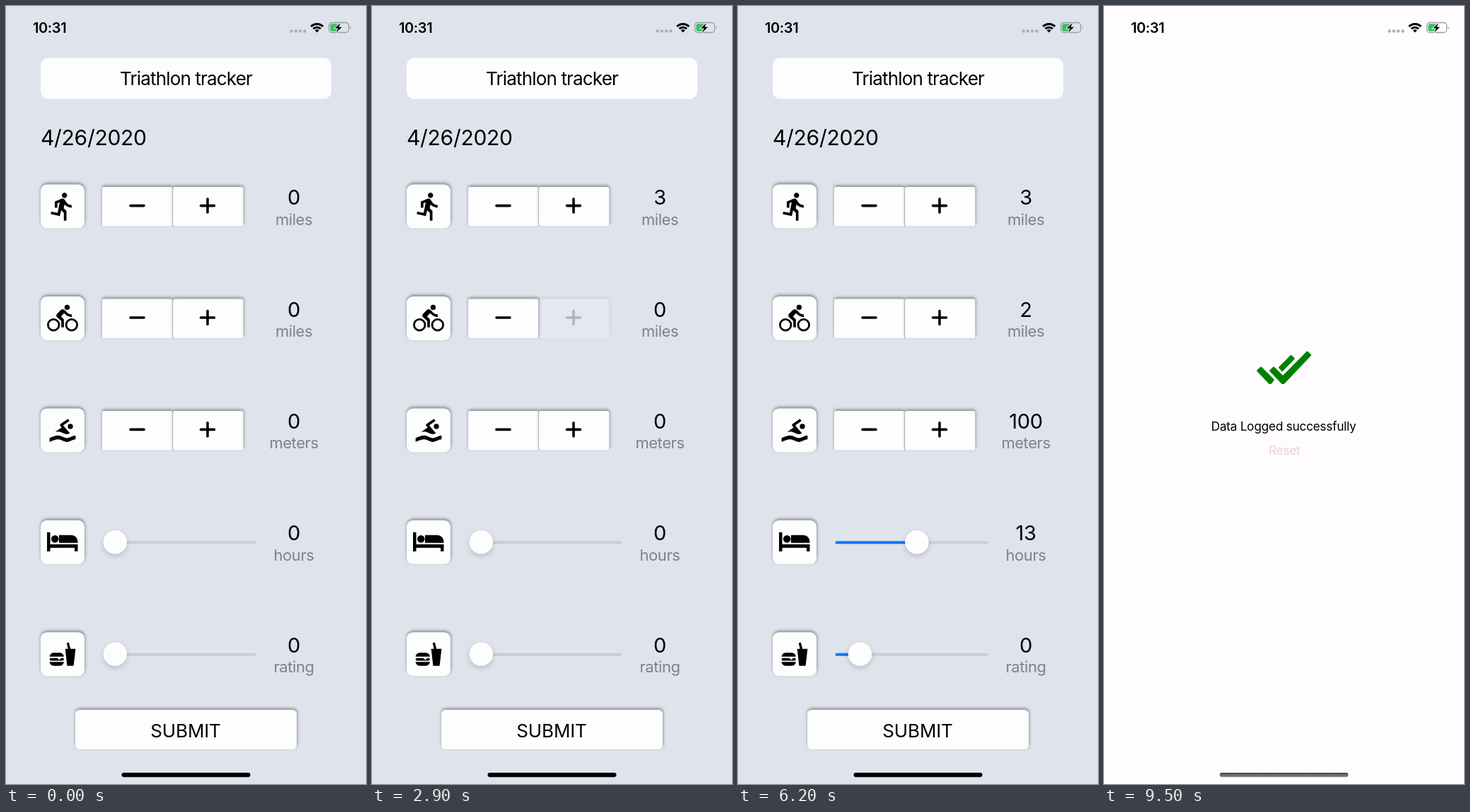
Write an HTML page that moves like this. It is 509 px wide and 1101 px high and loops after 9600 ms.

```html
<!DOCTYPE html>
<html lang="en">
<head>
<meta charset="utf-8">
<title>Triathlon tracker</title>
<style>
html, body { margin: 0; height: 100%; overflow: hidden; background: #dfe3ec; }
svg { display: block; width: 509px; height: 1101px; }
text { font-family: Inter, sans-serif; font-optical-sizing: none; letter-spacing: -.02em; }
.mid { text-anchor: middle; }
.card { fill: #fdfdfe; filter: url(#lift); }
.sign { fill: none; stroke: #000; stroke-width: 3.6; stroke-linecap: round; }
.unit { font-size: 22px; fill: #7f8186; }
.count { font-size: 29px; letter-spacing: -.01em; }
.track { stroke: #c9cdd6; stroke-width: 4; stroke-linecap: round; }
.filled { stroke: #0a7afe; }
.thumb { fill: #fdfdfe; filter: url(#soft); }
</style>
</head>
<body>
<svg viewBox="0 0 509 1101">
  <defs>
    <filter id="lift" x="-20%" y="-30%" width="140%" height="160%" color-interpolation-filters="sRGB">
      <feDropShadow dx=".5" dy="-2" stdDeviation="2" flood-opacity=".42"/>
    </filter>
    <filter id="soft" x="-40%" y="-40%" width="180%" height="200%" color-interpolation-filters="sRGB">
      <feDropShadow dx="0" dy="3" stdDeviation="3.5" flood-opacity=".17"/>
    </filter>
    <linearGradient id="bar" x2="0" y2="1">
      <stop stop-color="#444"/><stop offset="1" stop-color="#8c8c8c"/>
    </linearGradient>
  </defs>

  <rect id="page" width="509" height="1101"/>

  <g id="form">
    <rect x="49" y="73.5" width="411" height="58" rx="11" fill="#fdfdfe"/>
    <text class="mid" x="254.5" y="112" font-size="26" style="letter-spacing:-.032em">Triathlon tracker</text>
    <text x="49" y="197" font-size="30" style="letter-spacing:-.01em">4/26/2020</text>
    <g id="rows"></g>
    <g id="submit">
      <rect class="card" x="98" y="996" width="313" height="56" rx="6"/>
      <text class="mid" x="254" y="1034.5" font-size="26" style="letter-spacing:-.005em">SUBMIT</text>
    </g>
  </g>

  <g id="done">
    <path fill="green" stroke="green" stroke-width="3" stroke-linejoin="round"
      d="M217.5 516L222 512L239 529L235.5 533.5H234zM235.5 516L240 512L253 525L287.5 490L291.5 494L254 533.5H252zM248.5 511.5L264.5 495.5L268 499L252 515.5z"/>
    <text class="mid" x="254" y="601" font-size="17.2" style="letter-spacing:-.013em">Data Logged successfully</text>
    <text id="reset" class="mid" x="255" y="635" font-size="17.2" fill="#a5174f" style="letter-spacing:-.013em">Reset</text>
  </g>

  <text x="38" y="37.5" font-size="20" font-weight="600">10:31</text>
  <path d="M403.5 35.5h.01m6.3 0h.01m6.3 0h.01m6.3 0h.01" stroke="#acafb6" stroke-width="4.4" stroke-linecap="round"/>
  <g transform="translate(439.7 37.5)" fill="none" stroke="#000" stroke-width="3">
    <path d="M-8.5-8.5A12 12 0 0 1 8.5-8.5M-5.2-5.2A7.4 7.4 0 0 1 5.2-5.2"/>
    <path d="M0 0L-3-3A4.2 4.2 0 0 1 3-3z" fill="#000" stroke="none"/>
  </g>
  <rect x="456.5" y="23.5" width="28" height="14" rx="4" fill="none" stroke="#9a9da3" stroke-width="1.3"/>
  <path d="M486.5 28.5q2.4 2 0 4.5z" fill="#9a9da3"/>
  <rect x="458.3" y="25.3" width="11.5" height="10.4" rx="2.3" fill="#35c25e"/>
  <path id="bolt" d="M473 24L465 31.5h4.5L467 37.5L475 29.8h-4.6z" stroke-width="2" paint-order="stroke"/>
  <rect id="home" x="163.5" y="1085" width="182" height="6.2" rx="3.1"/>
</svg>
<script>
const LOOP = 9600;
const $ = id => document.getElementById(id);
const clamp = x => Math.max(0, Math.min(1, x));

// Icons on a 24-unit grid, except the bed, which is drawn in pixels around its centre
const grid = d => `<path transform="scale(1.835) translate(-12 -12)" d="${d}"/>`;
const run = grid('M13.49 5.48c1.1 0 2-.9 2-2s-.9-2-2-2-2 .9-2 2 .9 2 2 2zm-3.6 13.9l1-4.4 2.1 2v6h2v-7.5l-2.1-2 .6-3c1.3 1.5 3.3 2.5 5.5 2.5v-2c-1.9 0-3.5-1-4.3-2.4l-1-1.6c-.4-.6-1-1-1.7-1-.3 0-.5.1-.8.1l-5.2 2.2v4.7h2v-3.4l1.8-.7-1.6 8.1-4.9-1-.4 2 7 1.4z');
const wheel = x => `<circle cx="${x}" cy="9.2" r="7.8" fill="none" stroke="#000" stroke-width="2.75"/>`;
const bike = wheel(-12.8) + wheel(12.8) + grid('M15.5 5.5a2 2 0 1 0 0-4 2 2 0 0 0 0 4zM10.8 10.5l2.4-2.4.8.8c1.3 1.3 3 2.1 5.1 2.1V9c-1.5 0-2.7-.6-3.6-1.5l-1.9-1.9c-.5-.4-1-.6-1.6-.6s-1.1.2-1.4.6L7.8 8.4c-.4.4-.6.9-.6 1.4 0 .6.2 1.1.6 1.4L11 14v5h2v-6.2z');
const swim = grid('M2 18C4.22 17 6.44 16 8.67 16 10.89 16 13.11 18 15.33 18 17.56 18 19.78 16 22 16v3c-2.22 0-4.44 2-6.67 2C13.11 21 10.89 19 8.67 19 6.44 19 4.22 20 2 21zM8.67 13c-.78 0-1.55.12-2.32.32l4.92-3.44-1.04-1.24A1 1 0 0 1 10.44 7.17l5.72-4L17.31 4.8 12.47 8.19l5.23 6.23c-.79.33-1.58.58-2.37.58C13.11 15 10.89 13 8.67 13zM18 7a2 2 0 1 1 0 4 2 2 0 0 1 0-4z');
const bed = '<path d="M-22-14h4.5V3h39v10h-4.5V8h-34.5v5H-22zM-5-10h17q9 .5 9.5 9.5V1H-5z"/><circle cx="-10.8" cy="-4.5" r="5.3"/>';
const food = grid('M15.5 21L14 8h2.23L15.1 3.46 16.84 3l1.25 5H22l-1.5 13zM5 11h5a3 3 0 0 1 3 3H2a3 3 0 0 1 3-3zM13 18a3 3 0 0 1-3 3H5a3 3 0 0 1-3-3zM3 15h5l1.5 1.5L11 15h1a1 1 0 0 1 0 2H3a1 1 0 0 1 0-2z');

// Steppers have tap times; sliders have a value over time
const rows = [
  { icon: run, unit: 'miles', step: 1, taps: [1200, 1500, 1900] },
  { icon: bike, unit: 'miles', step: 1, taps: [2900, 3100] },
  { icon: swim, unit: 'meters', step: 100, taps: [3800] },
  { icon: bed, unit: 'hours', max: 24, value: t => t < 4800 ? 0 :
      Math.round(7 - 6 * Math.cos(Math.PI * clamp((t - 4800) / 400))) },
  { icon: food, unit: 'rating', max: 10, value: t => t < 6200 ? 0 : 1 }
];

const stepper = `
  <rect class="card" x="136" y="-27.5" width="99.3" height="55.5" rx="3"/>
  <path class="sign" d="M176-1h19"/>
  <g class="plus">
    <rect class="card" x="236" y="-27.5" width="99.3" height="55.5" rx="3"/>
    <path class="sign" d="M275.5-1h19M285-10.5v19"/>
  </g>
  <path d="M235.6-27.5v55.5" stroke="#b3b5ba"/>`;
const slider = `
  <path class="track" d="M139.5.5H351.5"/>
  <path class="track filled"/>
  <circle class="thumb" cy="0" r="16.7"/>`;

$('rows').innerHTML = rows.map((row, i) => `
  <g transform="translate(0 ${283.6 + 158.4 * i})">
    <rect class="card" x="49" y="-31" width="62" height="62" rx="9"/>
    <g transform="translate(80 0)">${row.icon}</g>
    ${row.taps ? stepper : slider}
    <text class="count mid" x="407" y="-2.5"></text>
    <text class="unit mid" x="407" y="26">${row.unit}</text>
  </g>`).join('');

rows.forEach((row, i) => {
  const group = $('rows').children[i];
  for (const part of ['plus', 'filled', 'thumb', 'count']) row[part] = group.querySelector('.' + part);
});

function drawRow(row, t) {
  if (row.taps) {
    const last = row.taps.filter(tap => tap <= t).pop() ?? -LOOP;
    row.plus.setAttribute('opacity', .2 + .8 * clamp((t - last - 50) / 250));
    row.count.textContent = row.step * row.taps.filter(tap => tap + 100 <= t).length;
  } else {
    const x = 154.3 + 182 * row.value(t) / row.max;
    row.thumb.setAttribute('cx', x);
    row.filled.setAttribute('d', x > 155 ? `M139.5.5H${x}` : '');
    row.count.textContent = row.value(t - 100);
  }
}

function draw(now) {
  const t = Math.floor(now % LOOP / 100) * 100;
  const done = t >= 7100;
  rows.forEach(row => drawRow(row, t));
  $('form').setAttribute('display', done ? 'none' : 'inline');
  $('done').setAttribute('display', done ? 'inline' : 'none');
  $('page').setAttribute('fill', done ? '#fefcff' : '#dfe3ec');
  $('bolt').setAttribute('stroke', done ? '#fefcff' : '#dfe3ec');
  $('home').setAttribute('fill', done ? 'url(#bar)' : '#000');
  $('submit').setAttribute('opacity', t >= 7000 ? .22 : 1);
  $('reset').setAttribute('opacity', t >= 9500 ? .2 : 1);
}

const start = performance.now();
(function tick() {
  draw(performance.now() - start);
  requestAnimationFrame(tick);
})();
</script>
</body>
</html>
```
